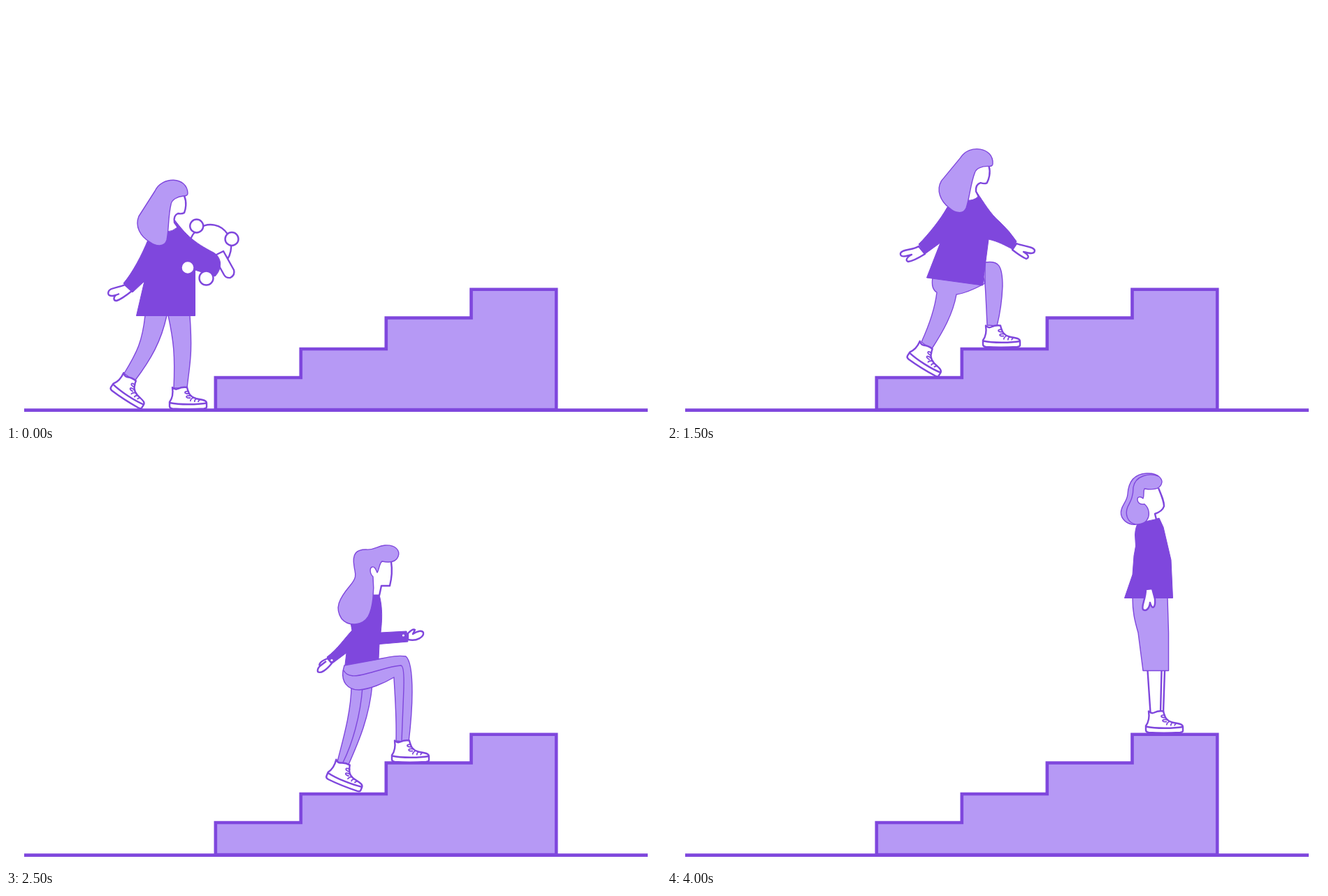
Recreate the animation shown at these times as an HTML page with a canvas. Size 937 px wide and 597 px high, loop 5 s.

```html
<!DOCTYPE html>
<html lang="en">
<head>
<meta charset="utf-8">
<title>Growing up the stairs</title>
<style>
  html, body { margin: 0; width: 100%; height: 100%; overflow: hidden; background: #fff; }
  canvas { display: block; }
</style>
</head>
<body>
<canvas id="stage" width="937" height="597"></canvas>
<script>
const ctx = document.getElementById('stage').getContext('2d');
const DARK = '#7f47dd', LIGHT = '#b699f5', WHITE = '#fff';

function shape(d, fill, width, color = DARK) {
  const path = new Path2D(d);
  if (fill) { ctx.fillStyle = fill; ctx.fill(path); }
  if (width) { ctx.strokeStyle = color; ctx.lineWidth = width; ctx.stroke(path); }
}
const soft = d => shape(d, LIGHT, 1.4);
const solid = d => shape(d, DARK, 1);
const outline = d => shape(d, WHITE, 2.4);
const line = (d, width = 2.4) => shape(d, null, width);

function disc(x, y, r, width = 2.4) {
  ctx.beginPath();
  ctx.arc(x, y, r, 0, 2 * Math.PI);
  ctx.fillStyle = WHITE;
  ctx.fill();
  if (width) { ctx.strokeStyle = DARK; ctx.lineWidth = width; ctx.stroke(); }
}

// Draws with local point (px, py) moved to (x, y) and turned by some degrees.
function at(x, y, degrees, draw, px = 0, py = 0) {
  ctx.save();
  ctx.translate(x, y);
  ctx.rotate(degrees * Math.PI / 180);
  ctx.translate(-px, -py);
  draw();
  ctx.restore();
}

// Origin is the bottom of the heel.
function shoe(x, y, degrees = 0) {
  at(x, y, degrees, () => {
    outline('M4-31Q8-27 12-29Q18-32 25-31C27-22 30-17 38-15C47-13 53-13 53-8V-3Q53-1 49-.5Q25 1 4-.5Q0-1 0-4V-10Q6-18 4-31Z');
    line('M0-9C15-6 38-6 53-8.5');
    line('M28-25C20-27 20-21 28-22M30-19C22-20 22-15 30-16M35-17Q29-14 30-11M39-15Q35-13 36-10M44-14Q41-12 41-10', 1.8);
  });
}

function stairs() {
  ctx.lineJoin = 'miter';
  shape('M299.8 578V532H421.8V491H543.8V446.5H665.5V405.7H787.2V578Z', LIGHT, 4.6);
  line('M26 578.6H918', 4.6);
  ctx.lineJoin = 'round';
}

function childHead() {
  line('M255 272C259 281 257 291 255 296Q252 298 246 297Q239 300 241 310L246 317');
  soft('M213 265C223 243 259 244 260 268Q260 272 254 272C245 273 237 277 236 284C232 300 233 320 230 335C227 346 214 344 206 338C192 330 184 315 190 301Z');
}

function childLegs() {
  soft('M199 443C195 480 188 495 169 526L184 537C208 505 222 480 230 443Z');
  soft('M232 443C240 480 242 500 240 547L259 547C263 510 267 500 263 443Z');
  shoe(148, 549, 33);
  shoe(234, 577);
}

function childBackHand() {
  outline('M170 399C163 403 149 403 147 408C144 415 150 416 157 414C153 418 154 422 158 422Q165 420 180 408Z');
  line('M157 414L162 412');
}

function childFrontHand() {
  outline('M371 389C380 393 396 393 397 399C397 405 389 403 381 401C388 405 390 409 385 411Q378 408 365 398Z');
}

function bear() {
  ctx.beginPath();
  ctx.ellipse(292, 345, 30, 32, 0.2, 0, 2 * Math.PI);
  ctx.fillStyle = WHITE; ctx.fill();
  ctx.strokeStyle = DARK; ctx.lineWidth = 2.4; ctx.stroke();
  disc(272.7, 315, 9.5);
  disc(323, 333.5, 9.5);
  outline('M297 358L311 351L326 378Q328 385 321 389Q315 390 312 385Z');
}

function toddler() {
  childLegs();
  bear();
  childBackHand();
  solid('M230 323Q238 323 245 317L241 306C258 328 268 338 297 353C310 361 309 377 299 387L270.5 378V443.5H186.5L198 394L181 410L168 397C181 382 195 355 203 335Z');
  disc(260, 374.5, 9.5);
  disc(286.5, 389.5, 10);
  childHead();
}

function childWalk() {
  childLegs();
  childBackHand();
  at(241, 310, -9, childFrontHand, 313, 314.5);
  solid('M230 323Q238 323 245 317L241 306C253 324 264 337 281 348L311 373L305 384C294 380 285 377 270 376L270.5 443.5H186.5L198 394L181 410L168 397C181 382 195 355 203 335Z');
  childHead();
}

function childClimb() {
  soft('M251 438C249 450 252 456 257 459C254 485 245 508 235 530L249 541C266 515 280 490 285 462C300 460 315 452 326 446L322 430Z');
  soft('M326 416C345 413 351 420 351 450C350 475 346 495 343 507L329 506C328 485 327 460 326 447Z');
  shoe(213, 553, 32);
  shoe(323, 537.5);
  outline('M231 393C222 399 207 397 205 403C204 409 211 408 221 405C213 409 212 414 216 415Q224 414 240 404Z');
  childFrontHand();
  solid('M301 327Q309 328 316 322L313 314C325 331 333 346 347 358Q361 371 371 386L365 397C355 392 345 386 331 383L322.5 449L242.5 438L262 388L240 404L231 390C245 376 262 355 272 337Z');
  at(313, 314.5, 7, childHead, 241, 310);
}

function teenClimb() {
  soft('M494 336C494 375 480 420 474 445L490 449C505 415 520 380 524 334Z');
  line('M510 338C507 380 495 420 482 446', 1.4);
  soft('M484 307L533 298C548 295 560 292 572 294C579 300 581 320 581 345C581 370 578 400 576 417L558 415C559 380 556 345 555 324C540 333 520 341 505 342C488 342 480 330 482 315Z');
  line('M483 314C488 324 500 323 515 319C535 314 550 308 565 307Q570 308 569 340L566 416', 1.4);
  shoe(457, 469, 22);
  shoe(552, 445.5);
  outline('M575 270C588 273 598 266 597 260C595 256 588 258 582 262L585 256Q582 254 575 261Z');
  outline('M460 297C450 301 447 305 449 308Q445 312 446 316C450 319 458 314 466 304Z');
  line('M449 308L458 301');
  solid('M520 206H534C539 225 538 242 536 260L573 258L575 273L534 276.5L533 298L485 306L487 289L467 304L459 295C475 283 485 267 495 257L492 240Z');
  disc(568.5, 264, 1.6, 0);
  disc(466, 299.5, 1.6, 0);
  line('M551 159C553 172 551 185 549 193H537L534 207');
  soft('M498 165C495 147 501 141 515 141C529 142 530 136 542 135C558 134 564 143 561 151C558 159 548 160 538 158C534 160 534 170 531 174C529 170 528 165 524 166C520 167 520 175 525 180C527 200 525 225 518 237C510 250 490 252 480 240C470 225 476 212 492 193C504 179 499 175 498 165Z');
}

function adultWalk() {
  soft('M596 305C585 340 570 380 559 408L574 414C588 390 597 372 607 354Z');
  line('M601 322C590 355 578 385 566 411', 1.4);
  soft('M583 262C584 287 595 315 602 342C606 370 607 395 611 413L629 413C630 360 629 310 627 258Z');
  line('M606 262C608 310 613 370 619 413', 1.4);
  shoe(539.5, 431.5, 22.5);
  shoe(605.5, 444, -0.7);
  outline('M667 223C675 223 688 215 685 208C682 205 675 209 669 214L672 208Q669 206 664 213Z');
  outline('M560 275L551 283L551 288Q548 292 551 295C556 298 561 292 567 279Z');
  line('M551 288L556 283');
  solid('M600 170H612C619 184 624 198 626 220L662 212L666 226L628 237L631.5 258Q608 265 582 262L569 279L560 272C569 260 579 242 584 226L581 212Z');
  disc(658.5, 218, 1.6, 0);
  disc(566.5, 275.5, 1.6, 0);
  line('M618 119C623 132 625 142 625 152Q620 156 613 156L612 171');
  soft('M566 130C562 115 570 110 582 109C597 107 600 97 613 97C626 97 630 110 624 116C618 122 610 121 604 124C602 130 604 135 602 139C598 130 592 131 592 135C592 142 597 142 598 147C603 165 606 185 603 202C600 215 588 221 575 218C560 214 556 202 559 190C564 172 574 165 574 152C570 142 567 137 566 130Z');
}

function elder() {
  line('M687.5 314L691.5 374M707.5 314L706 374M712 314L710 374');
  shoe(685, 403.5);
  soft('M666 210C666 230 669 243 674 260L681 314.5H717.5V260L716 210Z');
  solid('M675 101Q688 101 698 98L704 96L710 109L721 156L723.5 210.5H654.5L666 177L668 150L670.5 136L669.5 120Q670 108 675 101Z');
  outline('M685 198L694 197L698 212C699 225 694 228 691 217C690 226 685 230 681 227C678 222 685 212 685 198Z');
  line('M703 53C708 65 711 72 711 79Q709 86 698 90L700 98');
  soft('M686 32C705 31 710 42 707 48C704 55 695 56 683 54C681 58 683 64 681 68C677 64 673 66 673 69C673 75 678 77 683 76C690 82 691 92 687 98C684 104 674 106 665 105C655 103 647 94 650 84C652 76 658 72 659 62C660 45 668 33 686 32Z');
  line('M703 36C690 31 670 35 667 52C667 66 663 72 659 80C655 90 658 102 670 105', 1.4);
}

// Each pose lasts one beat; the last one holds for two.
const BEAT = 500, LOOP = 5000;
const poses = [
  [toddler, 0, 0],
  [childClimb, 0, 0],
  [childWalk, 132, -44],
  [childClimb, 129, -49],
  [childWalk, 249, -87],
  [teenClimb, 0, 0],
  [adultWalk, 0, 0],
  [teenClimb, 133.5, -42],
  [elder, 0, 0]
];

function render(now) {
  const beat = Math.floor((now % LOOP) / BEAT);
  const [pose, dx, dy] = poses[Math.min(beat, poses.length - 1)];
  ctx.fillStyle = WHITE;
  ctx.fillRect(0, 0, 937, 597);
  stairs();
  at(dx, dy, 0, pose);
}

let start;
function tick(now) {
  start ??= now;
  render(now - start);
  requestAnimationFrame(tick);
}
render(0);
requestAnimationFrame(tick);
</script>
</body>
</html>
```
